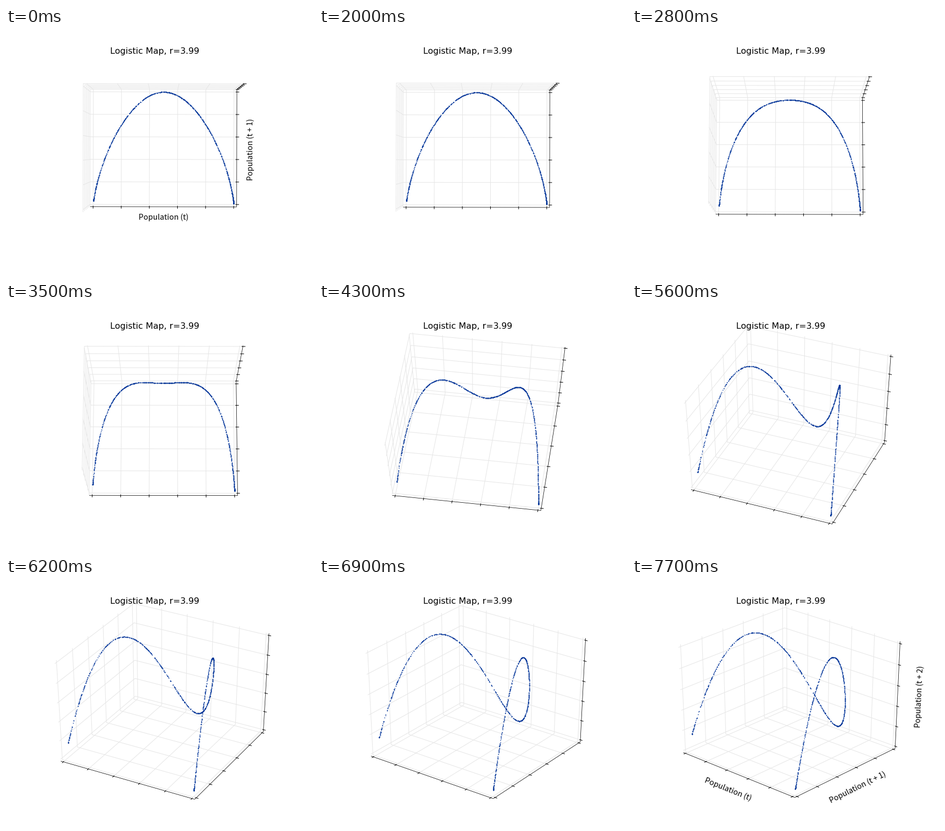
A matplotlib script that plays this animation: 572x460 px, repeating every 10 s.

```python
import numpy as np
import matplotlib.pyplot as plt
from matplotlib.animation import FuncAnimation
from matplotlib.collections import LineCollection

plt.rcParams["text.kerning_factor"] = 6

W, H = 572, 460
FRAMES, INTERVAL = 100, 100
RATE, GENS = 3.99, 1000
DIST = 11.0
CENTER = np.array([293.5, 223.6])
SCALE = 3018 * np.array([1, 0.8])
LO, HI = -1 / 48, 1 + 1 / 48        # padded box around the unit cube
TICKS = np.linspace(0, 1, 6)
TICK_OUT, TICK_IN = 1 / 60, 1 / 120

# (first frame, last frame, elevation step, azimuth step)
MOVES = [
    (20, 22, -0.5, 0.0),
    (23, 36, -1.0, 0.0),
    (37, 60, -1.5, 1.1),
    (61, 64, -1.0, 1.1),
    (65, 73, -0.5, 1.1),
    (74, 76, -0.2, 0.5),
]


def camera(n):
    elev, azim = 89.9, 270.1
    for first, last, de, da in MOVES:
        steps = min(max(n - first + 1, 0), last - first + 1)
        elev += de * steps
        azim += da * steps
    return np.radians(elev), np.radians(azim)


def project(points, elev, azim):
    """Perspective view of unit-cube points, in stage pixels."""
    ce, se, ca, sa = np.cos(elev), np.sin(elev), np.cos(azim), np.sin(azim)
    right = np.array([-sa, ca, 0])
    down = np.array([ca * se, sa * se, -ce])
    toward = np.array([ca * ce, sa * ce, se])
    p = np.asarray(points, float) - 0.5
    flat = np.stack([p @ right, p @ down], axis=-1)
    return CENTER + SCALE * flat / (DIST - p @ toward)[..., None]


def orbit():
    pops = [0.5]
    for _ in range(GENS - 1):
        pops.append(pops[-1] * RATE * (1 - pops[-1]))
    pops = np.array(pops)
    return np.column_stack([pops[:-2], pops[1:-1], pops[2:]])


def grid_lines():
    """Each line bends along two of the back planes x=LO, y=HI, z=LO."""
    back, front = (LO, HI, LO), (HI, LO, HI)
    lines = []
    for axis in range(3):
        for t in TICKS:
            corner = list(back)
            corner[axis] = t
            ends = []
            for other in ((axis + 1) % 3, (axis + 2) % 3):
                end = list(corner)
                end[other] = front[other]
                ends.append(end)
            lines.append([ends[0], corner, ends[1]])
    return np.array(lines)


def tick_lines():
    x = [[(t, LO - TICK_OUT, LO), (t, LO + TICK_IN, LO)] for t in TICKS]
    y = [[(HI + TICK_OUT, t, LO), (HI - TICK_IN, t, LO)] for t in TICKS]
    z = [[(HI + TICK_OUT, HI, t), (HI - TICK_IN, HI, t)] for t in TICKS]
    return np.array(x + y + z)


POINTS = orbit()
GRID = grid_lines()
MARKS = tick_lines()
SPINES = np.array([
    [(LO, LO, LO), (HI, LO, LO)],
    [(HI, LO, LO), (HI, HI, LO)],
    [(HI, HI, LO), (HI, HI, HI)],
])

# At 72 dpi one point is one pixel.
fig = plt.figure(figsize=(W / 72, H / 72), dpi=72, facecolor="white")
ax = fig.add_axes([0, 0, 1, 1])
ax.set(xlim=(0, W), ylim=(H, 0))
ax.axis("off")


def add_lines(color, width, z):
    return ax.add_collection(
        LineCollection([], colors=color, linewidths=width, zorder=z),
        autolim=False)


def add_label(x, y, text, angle):
    return ax.text(x, y, text, rotation=angle, ha="center", va="center",
                   family="Noto Sans CJK JP", size=14.3, zorder=5)


grid = add_lines("#e6e6e6", 1.0, 1)
spines = add_lines("black", 0.75, 2)
marks = add_lines("black", 1.0, 2)
dots, = ax.plot([], [], "o", color="#003399", markersize=1.6,
                markeredgewidth=0, zorder=3)
ax.text(277, 48, "Logistic Map, r=3.99", family="DejaVu Sans", size=16,
        ha="center", va="baseline", zorder=5)

top_labels = [
    add_label(293.5, 353, "Population (t)", 0),
    add_label(455.5, 226, "Population (t + 1)", 90),
]
side_labels = [
    add_label(178.5, 394, "Population (t)", -22),
    add_label(420.5, 389.5, "Population (t + 1)", 26.2),
    add_label(535, 220.5, "Population (t + 2)", 87.3),
]


def draw(n):
    view = camera(n)
    grid.set_segments(project(GRID, *view))
    spines.set_segments(project(SPINES, *view))
    marks.set_segments(project(MARKS, *view))
    dots.set_data(*project(POINTS, *view).T)
    for label in top_labels:
        label.set_visible(n < 20)
    for label in side_labels:
        label.set_visible(n >= 77)
    return [grid, spines, marks, dots, *top_labels, *side_labels]


anim = FuncAnimation(fig, draw, frames=FRAMES, init_func=lambda: draw(0),
                     interval=INTERVAL, repeat=True, repeat_delay=0)
plt.show()
```
